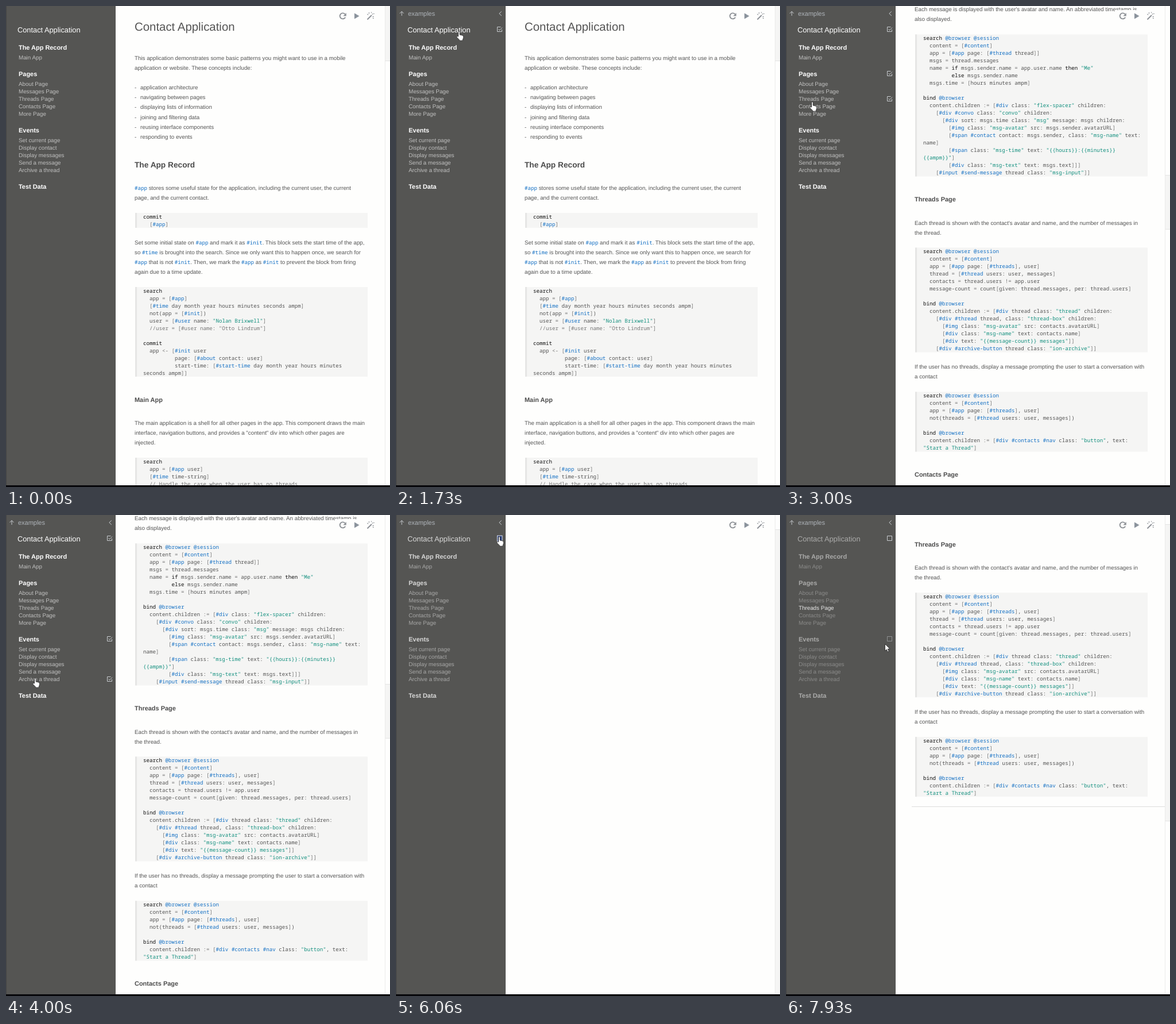
Recreate the animation shown at these times as an HTML page. Size 669x837 px, loop 8 s.

```html
<!DOCTYPE html>
<html lang="en">
<head>
<meta charset="utf-8">
<title>Contact Application</title>
<style>
html, body { margin: 0; width: 100%; height: 100%; overflow: hidden; background: #fefefd; }
svg { display: block; width: 669px; height: 837px; }
text { font-family: "Liberation Sans", Arial, sans-serif; white-space: pre; text-rendering: geometricPrecision; }
.body { font-size: 9.78px; fill: #555; }
.h1 { font-size: 20.4px; fill: #555; }
.h2 { font-size: 13.7px; font-weight: bold; fill: #4c4c4c; }
.h3 { font-size: 10.96px; font-weight: bold; fill: #4c4c4c; }
.code { font-family: "Noto Sans Mono", "DejaVu Sans Mono", monospace; font-size: 9.163px; fill: #555; }
.tag { fill: #1470c4; }
.str { fill: #14907f; }
.key { fill: #111; }
.sym, .note { fill: #777; }
#toc text { fill: #fff; }
.title { font-size: 12.8px; }
.section { font-size: 10.95px; font-weight: bold; }
.item { font-size: 9.8px; }
.line { fill: none; stroke: #c8ccd0; stroke-width: 1; }
</style>
</head>
<body>
<svg viewBox="0 0 669 837">
  <rect width="669" height="837" fill="#fefefd"/>
  <g id="docs"></g>
  <rect x="573" y="7" width="84" height="23" fill="#fefefd"/>
  <g fill="none" stroke="#8d9196" stroke-width="1.9">
    <path d="M591.2 19.6A5 5 0 1 1 590.4 14"/>
    <path d="M592.8 12v5.4h-5.4z" fill="#8d9196" stroke="none"/>
    <path d="M607 12.5v10l8.5-5z" fill="#8b939c" stroke="none"/>
    <path d="M629.5 23.5l7.5-7.5"/>
    <path d="M638 14.8l1.6-1.6M632.5 11v2.5M641 18.5h-2.5M636.5 10.5v1.8M642 13.5h-1.5M631 15.5l-1.5-1.5M640.5 22l-1.5-1.5" stroke-width="1.1"/>
  </g>
  <rect x="660" width="9" height="834" fill="#fefefd"/>
  <rect id="thumb" x="660.5" width="9" fill="#f5f5f4" stroke="#e4e4e3"/>
  <path d="M660.5 0V834" stroke="#ebebea"/>
  <rect width="191" height="834" fill="#555553"/>
  <path d="M.5 0V834" stroke="#454544"/>
  <g id="header">
    <path class="line" d="M10 17V9.5M6.5 13L10 9.5L13.5 13M183.8 9.5l-4 3.7 4 3.7"/>
    <text x="21" y="16.7" font-size="10.98" fill="#b0b5bb">examples</text>
  </g>
  <g id="toc"></g>
  <rect id="focus" x="176.5" y="36" width="8.5" height="10" fill="#2b3f78" stroke="#dfe6f5"/>
  <rect y="834" width="669" height="3" fill="#08080c"/>
  <g id="cursor" fill="#fff" stroke="#222" stroke-width=".8" stroke-linejoin="round">
    <path id="hand" d="M-1.500 10V2a1.300 1.300 0 0 1 2.600 0v5l5 1.200q1.400.4 1.300 2v2.500l-1.200 3v1.500H.5l-.3-1.500L-4 11.500q-.8-1.500.8-1.900z"/>
    <path id="arrow" d="M.5 .5v12l2.800-2.600 1.900 4.300 2-.9-1.900-4.200h3.800z"/>
  </g>
</svg>
<script>
const FPS = 15, FRAMES = 120;
const $ = id => document.getElementById(id);
const show = (el, on) => el.setAttribute('visibility', on ? 'visible' : 'hidden');
const esc = s => s.replace(/&/g, '&amp;').replace(/</g, '&lt;');
const text = (cls, x, y, html) => `<text class="${cls}" x="${x}" y="${y}">${html}</text>`;

// Document building blocks
const TOKEN = /(?<str>^\{\{\w+\}\}"|"[^"]*"?)|(?<tag>[#@][\w-]+)|(?<key>\b(?:search|commit|bind|if|then|else)\b)|(?<sym>[\[\]]|(?<= )[:=<+!-]+(?= ))/g;

function highlight(line) {
  if (/^\s*\/\//.test(line)) return `<tspan class="note">${esc(line)}</tspan>`;
  let html = '', last = 0;
  for (const m of line.matchAll(TOKEN)) {
    const kind = Object.keys(m.groups).find(k => m.groups[k]);
    html += esc(line.slice(last, m.index)) + `<tspan class="${kind}">${esc(m[0])}</tspan>`;
    last = m.index + m[0].length;
  }
  return html + esc(line.slice(last));
}

const h1 = (y, s) => text('h1', 224, y + 7.3, s);
const h2 = (y, s) => text('h2', 224, y + 5, s);
const h3 = (y, s) => text('h3', 224, y + 3.8, s);
const inline = s => esc(s).replace(/#[\w-]+/g, '<tspan class="code tag">$&</tspan>');
const para = (y, ...lines) => lines.map((s, i) => text('body', 224, y + 3.1 + i * 17.15, inline(s))).join('');
const list = (y, ...lines) => lines.map((s, i) =>
  para(y + i * 17.15, '-') + text('body', 234, y + 3.1 + i * 17.15, s)).join('');

function code(y, source) {
  const lines = source.split('\n'), h = lines.length * 13;
  return `<rect x="225" y="${y}" width="405" height="${h}" fill="#f5f5f4"/>` +
    `<rect x="225" y="${y}" width="3" height="${h}" fill="#e6e6e5"/>` +
    lines.map((s, i) => text('code', 239, y + 9.9 + i * 13, highlight(s))).join('');
}

const intro = h1(36, 'Contact Application') +
  para(90.5, 'This application demonstrates some basic patterns you might want to use in a mobile',
    'application or website. These concepts include:') +
  list(142, 'application architecture', 'navigating between pages', 'displaying lists of information',
    'joining and filtering data', 'reusing interface components', 'responding to events') +
  h2(275.5, 'The App Record') +
  para(317, '#app stores some useful state for the application, including the current user, the current',
    'page, and the current contact.') +
  code(360, `commit
  [#app]`) +
  para(411.5, 'Set some initial state on #app and mark it as #init. This block sets the start time of the app,',
    'so #time is brought into the search. Since we only want this to happen once, we search for',
    '#app that is not #init. Then, we mark the #app as #init to prevent the block from firing',
    'again due to a time update.') +
  code(489, `search
  app = [#app]
  [#time day month year hours minutes seconds ampm]
  not(app = [#init])
  user = [#user name: "Nolan Brixwell"]
  //user = [#user name: "Otto Lindrum"]

commit
  app <- [#init user
          page: [#about contact: user]
          start-time: [#start-time day month year hours minutes
seconds ampm]]`) +
  h3(685, 'Main App') +
  para(725.5, 'The main application is a shell for all other pages in the app. This component draws the main',
    'interface, navigation buttons, and provides a "content" div into which other pages are', 'injected.') +
  code(786, `search
  app = [#app user]
  [#time time-string]
  // Handle the case when the user has no threads`);

const threads = h3(336.5, 'Threads Page') +
  para(377.5, "Each thread is shown with the contact's avatar and name, and the number of messages in",
    'the thread.') +
  code(420.5, `search @browser @session
  content = [#content]
  app = [#app page: [#threads], user]
  thread = [#thread users: user, messages]
  contacts = thread.users != app.user
  message-count = count[given: thread.messages, per: thread.users]

bind @browser
  content.children := [#div thread class: "thread" children:
    [#div #thread thread, class: "thread-box" children:
      [#img class: "msg-avatar" src: contacts.avatarURL]
      [#div class: "msg-name" text: contacts.name]
      [#div text: "{{message-count}} messages"]]
    [#div #archive-button thread class: "ion-archive"]]`) +
  para(628, 'If the user has no threads, display a message prompting the user to start a conversation with',
    'a contact') +
  code(671.5, `search @browser @session
  content = [#content]
  app = [#app page: [#threads], user]
  not(threads = [#thread users: user, messages])

bind @browser
  content.children := [#div #contacts #nav class: "button", text:
"Start a Thread"]`);

const pages = para(6, "Each message is displayed with the user's avatar and name. An abbreviated timestamp is",
    'also displayed.') +
  code(49.5, `search @browser @session
  content = [#content]
  app = [#app page: [#thread thread]]
  msgs = thread.messages
  name = if msgs.sender.name = app.user.name then "Me"
         else msgs.sender.name
  msgs.time = [hours minutes ampm]

bind @browser
  content.children := [#div class: "flex-spacer" children:
    [#div #convo class: "convo" children:
      [#div sort: msgs.time class: "msg" message: msgs children:
        [#img class: "msg-avatar" src: msgs.sender.avatarURL]
        [#span #contact contact: msgs.sender, class: "msg-name" text:
name]
        [#span class: "msg-time" text: "{{hours}}:{{minutes}}
{{ampm}}"]
        [#div class: "msg-text" text: msgs.text]]]
    [#input #send-message thread class: "msg-input"]]`) +
  threads + h3(815, 'Contacts Page');

const events = code(-11, `  app = [#app]

commit
  app.contact := contact
  app.page := [#about contact]`) +
  h3(93.5, 'Display messages') +
  para(134.5, 'Messages are displayed for a current thread. By displaying messages, they are automatically',
    'marked as read, which decrements the count on the navigation bar.') +
  code(177.5, `search @event @browser @session
  [#click element: [#thread thread]]
  app = [#app]

commit
  app.page := [#thread thread]
  thread.messages -= #unread`) +
  h3(308.5, 'Send a message') +
  para(349, 'When the user presses "enter" in the message input box, a message is added to the current',
    'thread, with the current time. This event should also clear the input box.') +
  code(392, `search @event @browser @session
  [#keydown key: "enter" element: input]
  input = [#send-message thread value]
  [#app user]
  time = [#time day month year hours minutes seconds ampm]

commit @browser
  input.value := ""
  thread.messages += [#message sender: user, time, text: value]`) +
  h3(549, 'Archive a thread') +
  para(590, 'When the user archives a thread, the #archive tag is added to that thread, which then',
    'exludes it from display in the main thread list. Archiving a thread also marks all unread',
    'messages as read.') +
  list(658.5, 'TODO Add a place to see all archived threads') +
  code(685, `search @event @browser @session
  [#click element: [#archive-button thread]]
  messages = thread.messages

commit @session
  thread += #archived
  messages -= #unread`) +
  h2(815, 'Test Data');

const filtered = `<g transform="translate(0 -285.3)">${threads}</g><path d="M219 507.5H660" stroke="#dededd"/>`;

// Each view starts at a frame and has its scroll thumb range
const views = [
  { at: 0, html: intro, thumb: [-1, 96] },
  { at: 45, html: pages, thumb: [294, 389] },
  { at: 64, html: events, thumb: [500, 596] },
  { at: 91, html: '', thumb: [25, 835] },
  { at: 112, html: filtered, thumb: [16, 533] }
];
$('docs').innerHTML = views.map(v => `<g>${v.html}</g>`).join('');

// Table of contents
const outline = [
  [72, 'The App Record', 'Main App'],
  [118, 'Pages', 'About Page', 'Messages Page', 'Threads Page', 'Contacts Page', 'More Page'],
  [216, 'Events', 'Set current page', 'Display contact', 'Display messages', 'Send a message', 'Archive a thread'],
  [314, 'Test Data']
];
const rows = [{ cls: 'title', x: 20, y: 41, base: 46, reach: 10, top: 0, bottom: 834, name: 'Contact Application' }];
for (const [y, name, ...items] of outline) {
  rows.push({ cls: 'section', x: 22, y, base: y + 4, reach: 7, top: y - 8, bottom: y + 11 + items.length * 13, name });
  items.forEach((name, i) => {
    const iy = y + 17.5 + i * 13;
    rows.push({ cls: 'item', x: 22, y: iy, base: iy + 3.7, reach: 6.5, top: iy - 6.5, bottom: iy + 6.5, name });
  });
}
const EMPTY_BOX = 'M0 0H8V8H0z';
const CHECKED_BOX = 'M6 0H0V8H8V4.5M2 3.5l2 2.300L8.500 1';
$('toc').innerHTML = rows.map(r => `<g>${text(r.cls, r.x, r.base, r.name)}` +
  `<path class="line" transform="translate(176.5 ${Math.round(r.y) - 4.5})"/></g>`).join('');
rows.forEach((r, i) => [r.label, r.box] = $('toc').children[i].children);

// Pointer hot spot: frame, x, y
const path = [
  [10, 272, 814], [26, 110, 43], [31, 110, 43], [40, 46, 165], [41, 46, 165], [42, 46, 166],
  [49, 46, 166], [58, 51, 281], [60, 51, 283], [75, 51, 283], [76, 63, 263], [83, 179, 39], [85, 179, 39],
  [86, 180, 38], [87, 180, 38], [88, 180, 37], [96, 180, 37], [101, 191.5, 95], [107, 180, 163],
  [115, 180, 163], [119, 172, 224]
];

function pointer(frame) {
  if (frame < path[0][0]) return { x: 999, y: 999 };
  const i = Math.max(1, path.findIndex(p => p[0] >= frame));
  const [f0, x0, y0] = path[i - 1], [f1, x1, y1] = path[i];
  const u = (frame - f0) / (f1 - f0);
  const k = i === 1 ? u * (2 - u) : u * u * (3 - 2 * u);
  return { x: Math.round(x0 + (x1 - x0) * k), y: Math.round(y0 + (y1 - y0) * k) };
}

const inSidebar = p => p.x < 191;
const covers = (r, p) => inSidebar(p) && p.y >= r.top && p.y < r.bottom;

function render(frame) {
  const p = pointer(frame), before = pointer(frame - 1), earlier = pointer(frame - 2);
  const current = views.filter(v => v.at <= frame).pop();
  views.forEach((v, i) => show($('docs').children[i], v === current));
  const [top, bottom] = current.thumb;
  $('thumb').setAttribute('y', top + .5);
  $('thumb').setAttribute('height', bottom - top - 1);

  const dim = frame < 91 ? 1 : frame < 92 ? .77 : .5;
  for (const r of rows) {
    const picked = r.name === 'Threads Page' && frame >= 112;
    const full = r.cls === 'item' ? .63 : 1;
    r.label.setAttribute('opacity', picked && frame > 112 ? .88 : full * dim);
    r.box.setAttribute('opacity', (covers(r, before) + covers(r, earlier)) / 2);
    r.box.setAttribute('d', frame < 91 || picked ? CHECKED_BOX : EMPTY_BOX);
  }

  show($('header'), inSidebar(p));
  show($('focus'), frame >= 88 && frame < 97);
  const over = inSidebar(p) && rows.some(r => Math.abs(p.y - r.y) <= r.reach);
  $('cursor').setAttribute('transform', `translate(${p.x} ${p.y})`);
  show($('hand'), over);
  show($('arrow'), !over);
}

let start, shown = -1;
function tick(now) {
  start ??= now;
  const frame = Math.floor((now - start) % 8000 * FPS / 1000 + .12) % FRAMES;
  if (frame !== shown) render(shown = frame);
  requestAnimationFrame(tick);
}
render(0);
requestAnimationFrame(tick);
</script>
</body>
</html>
```
